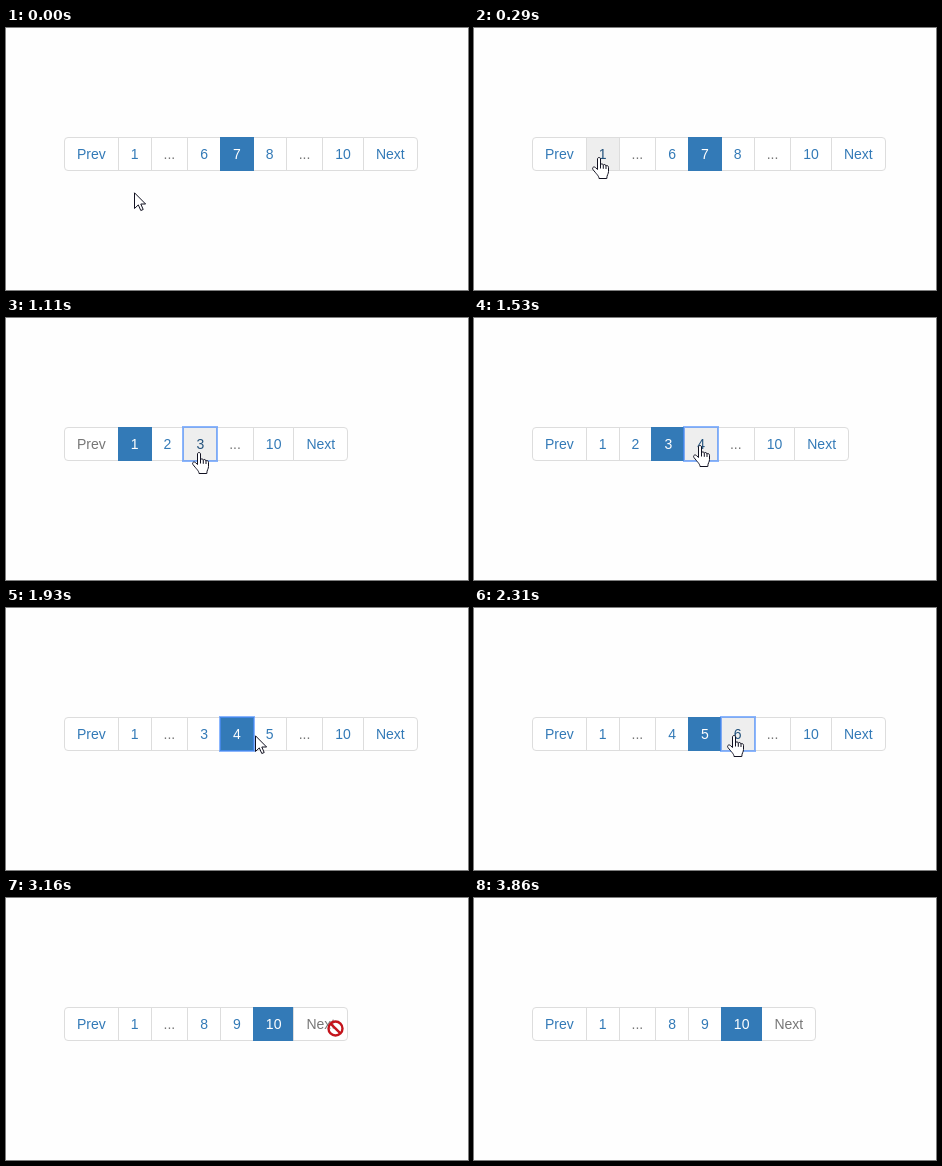
An HTML page for the animation above (3980 ms loop, 462 px wide and 262 px high).

```html
<!DOCTYPE html>
<html lang="en">
<head>
<meta charset="utf-8">
<title>Pagination</title>
<style>
html, body {
  margin: 0;
  width: 100%;
  height: 100%;
  overflow: hidden;
  background: #fefefe;
}
#pager {
  position: absolute;
  left: 58px;
  top: 109px;
  width: 400px;
  font: 14px/20px "Liberation Sans", Arial, sans-serif;
}
#pager span {
  position: relative;
  float: left;
  margin-left: -1px;
  padding: 6px 12px;
  border: 1px solid #ddd;
  background: #fff;
  color: #337ab7;
}
#pager span:first-child { margin-left: 0; border-radius: 4px 0 0 4px; }
#pager span:last-child { border-radius: 0 4px 4px 0; }
#pager .hover, #pager .focus { z-index: 3; background: #eee; color: #23527c; }
#pager .off { background: #fff; color: #777; }
#pager .active { z-index: 2; background: #337ab7; border-color: #337ab7; color: #fff; }
#pager .focus { z-index: 4; outline: 2px solid rgba(77, 144, 254, .65); outline-offset: -1px; }
svg { position: absolute; left: 0; top: 0; z-index: 9; }
svg g { display: none; }
</style>
</head>
<body>
<div id="pager"></div>
<svg width="462" height="262" viewBox="0 0 462 262">
  <g id="arrow" fill="#fff" stroke="#101020">
    <path d="M.5 .8V16.5L4.3 12.9L6.8 18.5L9.2 17.5L6.8 12H11.6Z"/>
  </g>
  <g id="hand" fill="#fff" stroke="#101020">
    <path d="M.5 12.5V2C.5 0 3.5 0 3.5 2V8C3.5 6.4 6.3 6.6 6.3 8.4C6.3 7 9 7.2 9 9.2C9 8 11.5 8.4 11.5 10.3V14.5C11.5 17 9.8 18 9.8 21.5H2C2 19 -1 16.5 -4 12.6C-5.4 10.4 -2.8 9 -1.3 10.8Z"/>
    <path d="M3.5 8V11.5M6.3 8.4V11.8M9 9.2V12" fill="none"/>
  </g>
  <g id="forbid" fill="#fff" fill-opacity=".45" stroke="#c4141c" stroke-width="2.4">
    <circle r="7"/>
    <path d="M-4.9 -4.9L4.9 4.9"/>
  </g>
</svg>
<script>
const LOOP = 3980, LAST = 10;

// time, page, hovered item, focused item, cursor, x, y
const steps = [
  [0, 7, -1, -1, "arrow", 128, 164],
  [130, 7, -1, -1, "arrow", 125, 157],
  [290, 7, 1, -1, "hand", 123, 129],
  [430, 7, 1, -1, "hand", 123, 126],
  [580, 1, 1, 1, "arrow", 129, 126],
  [710, 1, 1, 1, "arrow", 137, 138],
  [840, 1, -1, 1, "arrow", 165, 148],
  [960, 1, 3, 1, "hand", 191, 134],
  [1110, 1, 3, 3, "hand", 191, 134],
  [1230, 3, 3, 3, "arrow", 190, 134],
  [1380, 3, 3, 3, "arrow", 213, 131],
  [1530, 3, 4, 4, "hand", 224, 127],
  [1660, 4, 4, 4, "arrow", 223, 127],
  [1800, 4, 4, 4, "arrow", 236, 127],
  [1930, 4, 4, 4, "arrow", 249, 127],
  [2070, 4, 5, 4, "hand", 258, 127],
  [2200, 4, 5, 5, "hand", 258, 127],
  [2310, 5, 5, 5, "hand", 258, 127],
  [2460, 5, -1, 5, "arrow", 280, 147],
  [2580, 5, -1, 5, "arrow", 303, 153],
  [2730, 5, 7, 5, "hand", 326, 136],
  [2860, 5, 7, 5, "hand", 329, 131],
  [3160, 10, 6, -1, "forbid", 329.5, 130.5],
  [3430, 10, -1, -1, "arrow", 340, 160],
  [3560, 10, -1, -1, "arrow", 356, 200],
  [3710, 10, -1, -1, "arrow", 421, 246],
  [3860, 10, -1, -1, "", 0, 0]
];

const pager = document.getElementById("pager");
const cursors = document.querySelectorAll("svg g");

function labels(page) {
  const from = Math.max(2, Math.min(page - 1, LAST - 2));
  const to = Math.min(LAST - 1, Math.max(page + 1, 3));
  const list = ["Prev", 1];
  if (from > 2) list.push("...");
  for (let n = from; n <= to; n++) list.push(n);
  if (to < LAST - 1) list.push("...");
  return [...list, LAST, "Next"];
}

function show([, page, hover, focus, cursor, x, y]) {
  pager.replaceChildren(...labels(page).map((label, i) => {
    const item = document.createElement("span");
    const off = label === "..." || (label === "Prev" && page === 1) ||
      (label === "Next" && page === LAST);
    item.textContent = label;
    item.classList.toggle("hover", i === hover);
    item.classList.toggle("focus", i === focus);
    item.classList.toggle("active", label === page);
    item.classList.toggle("off", off);
    return item;
  }));
  for (const g of cursors) {
    g.style.display = g.id === cursor ? "inline" : "none";
    g.setAttribute("transform", `translate(${x} ${y})`);
  }
}

let current;
const start = performance.now();
function tick() {
  const t = (performance.now() - start) % LOOP;
  const step = steps.findLast(s => s[0] <= t);
  if (step !== current) show(current = step);
  requestAnimationFrame(tick);
}
tick();
</script>
</body>
</html>
```
